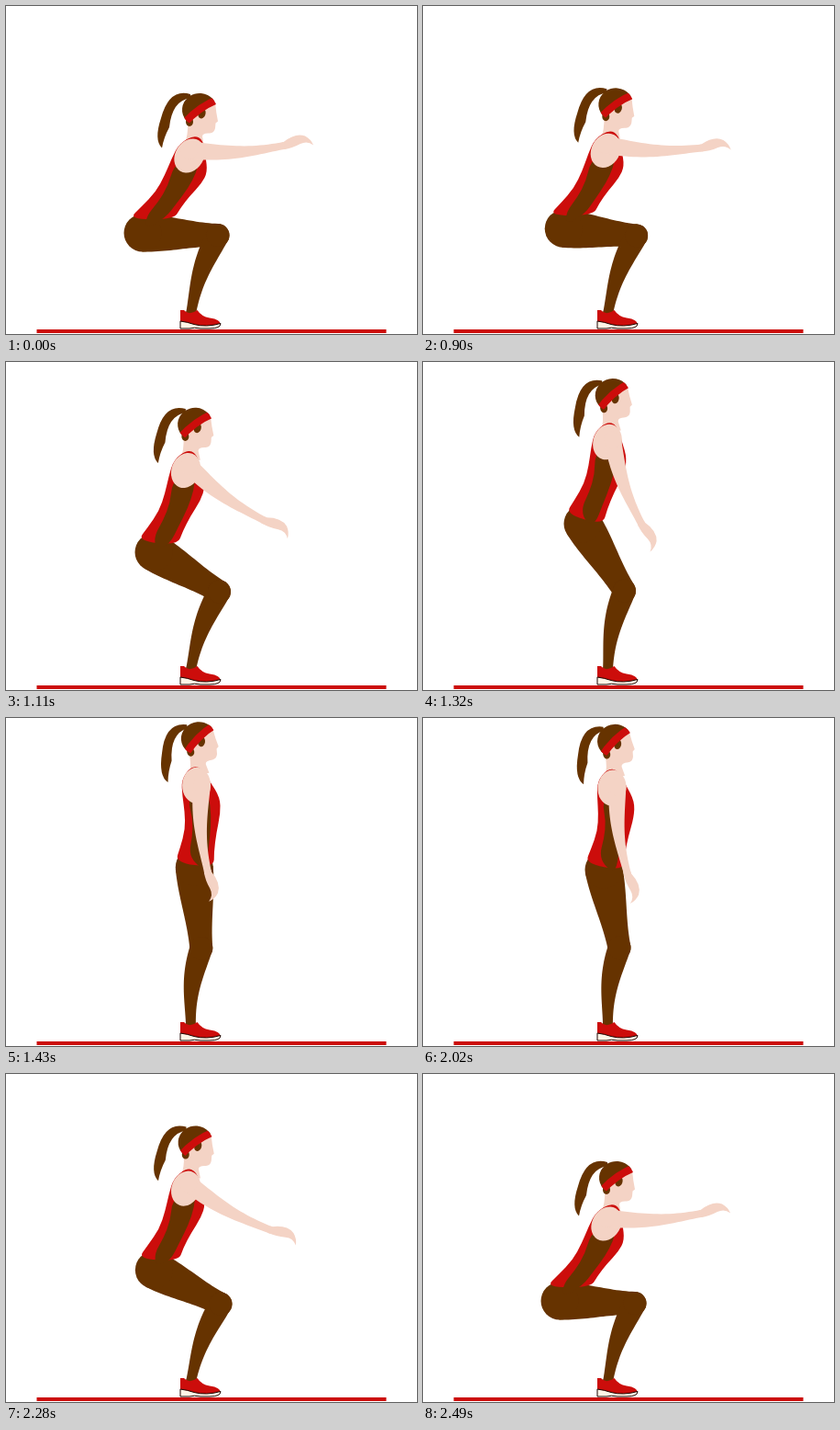
Recreate the animation shown at these times as an HTML page with a canvas. Size 448 by 357 pixels, loop 2.79 s.

```html
<!DOCTYPE html>
<html lang="en">
<head>
<meta charset="utf-8">
<title>Squat</title>
<style>
html, body { margin: 0; width: 100%; height: 100%; overflow: hidden; background: #fff; }
canvas { display: block; width: 448px; height: 357px; }
</style>
</head>
<body>
<canvas id="stage"></canvas>
<script>
const W = 448, H = 357, LOOP = 2790, TOP = 21;
const RED = '#cc0d0b', BROWN = '#663300', SKIN = '#f4d3c5';
const ANKLE = [201.5, 335];
const canvas = document.getElementById('stage');
const ctx = canvas.getContext('2d');
const dpr = window.devicePixelRatio || 1;
canvas.width = W * dpr;
canvas.height = H * dpr;

// Joints at four heights of the rise, from the squat to nearly upright.
const HEIGHTS = [0, 9, 17, 20.2];
const JOINTS = {
  knee: [[231, 249.5], [232.5, 250], [219.5, 249], [214, 250]],
  hip: [[149, 247], [161, 207], [174, 176], [197, 165]],
  shoulder: [[200, 163], [196, 118], [201, 87], [206, 76]],
  wrist: [[303, 152], [281.5, 172.5], [238, 176], [223, 170]],
  tilt: [[0], [-1], [-6], [-9]]
};

// Torso outlines: distance in front of the spine, distance above the hip.
const SHIRT = [[-21, 5], [-16, 23], [-11, 45], [-12, 66], [-15, 85], [-16.5, 104], [-7, 120],
  [4, 120], [15, 107], [26, 93], [27, 79], [23, 61], [21, 44], [21.5, 30]];
const PANEL = [[-9, 80], [-3, 58], [-3, 37], [-6, 18], [0, 5],
  [13, 27], [15, 48], [17, 67], [16, 86], [11, 101], [0, 95]];

const smooth = t => t * t * (3 - 2 * t);

// Lagrange weights: one smooth curve through all keys.
function weights(keys, x) {
  return keys.map((a, i) => keys.reduce((p, b, j) => i === j ? p : p * (x - b) / (a - b), 1));
}

function rise(t) {
  if (t < 900) return 0;
  if (t < 2020) return Math.min(TOP, Math.floor((t - 900) / 26) + 1);
  const step = Math.min(18, Math.floor((t - 2020) / 27.6) + 1);
  const [a, b] = weights([1, 10, 18], step);
  return 20.2 * a + 7.5 * b;
}

function poseAt(height) {
  const w = weights(HEIGHTS, height), pose = {};
  for (const name in JOINTS) {
    const keys = JOINTS[name];
    pose[name] = keys[0].map((_, i) => w.reduce((sum, k, j) => sum + k * keys[j][i], 0));
  }
  return pose;
}

function fill(color, path) {
  ctx.fillStyle = color;
  if (path) ctx.fill(path); else ctx.fill();
}

// Rounded limb from a to b; its radius eases from ra to rb, its middle bows sideways.
function limb(a, b, ra, rb, bow, color) {
  const dx = b[0] - a[0], dy = b[1] - a[1], len = Math.hypot(dx, dy);
  const nx = -dy / len, ny = dx / len, N = 24;
  ctx.beginPath();
  for (let i = 0; i <= 2 * N + 1; i++) {
    const side = i <= N ? 1 : -1;
    const t = (i <= N ? i : 2 * N + 1 - i) / N;
    const off = bow * Math.sin(Math.PI * t) + side * (ra + (rb - ra) * smooth(t));
    ctx.lineTo(a[0] + dx * t + nx * off, a[1] + dy * t + ny * off);
  }
  fill(color);
  for (const [p, r] of [[a, ra], [b, rb]]) {
    ctx.beginPath();
    ctx.arc(p[0], p[1], r, 0, 2 * Math.PI);
    fill(color);
  }
}

// Closed curve that rounds every corner between the edge midpoints.
function blob(points, color) {
  const n = points.length;
  const mid = i => [0, 1].map(k => (points[i % n][k] + points[(i + 1) % n][k]) / 2);
  ctx.beginPath();
  ctx.moveTo(...mid(0));
  for (let i = 1; i <= n; i++) ctx.quadraticCurveTo(...points[i % n], ...mid(i));
  fill(color);
}

function oval(x, y, rx, ry, color, turn = 0) {
  ctx.beginPath();
  ctx.ellipse(x, y, rx, ry, turn, 0, 2 * Math.PI);
  fill(color);
}

function local([x, y], angle, paint) {
  ctx.save();
  ctx.translate(x, y);
  ctx.rotate(angle);
  paint();
  ctx.restore();
}

const tail = new Path2D('M201 96Q178 89 169 122Q161 146 170 154.5Q172 143 178 132Q181 103 201 100Z');
const face = new Path2D('M199 112L228 105Q229 116 231 125.5L228.5 127.5L228 133Q227 138 222 138.5Q214 138 214 142L216 152H194Q199 140 198 126Z');
const hand = new Path2D('M0-4Q14-13 24-8Q30-4 32 3Q26-3 18 0Q8 4 0 4Z');
const upper = new Path2D('M190 331H194Q198 336 205 333L208.5 331Q213 338 222 339.5Q234 341 234 347L220 350L190 347Z');
const sole = new Path2D('M190 343Q198 344 205 346.5Q218 350 234 345.5Q234 351 222 351H212Q205 349.5 200 351H190Z');

function drawHead() {
  ctx.translate(-200, -163);
  fill(BROWN, tail);
  fill(SKIN, face);
  oval(200, 126, 4, 5, BROWN);
  oval(213.5, 117, 4, 5.5, BROWN, 0.3);
  ctx.beginPath();
  ctx.ellipse(211, 113, 19, 18, 0, 2.45, 5.75);
  fill(BROWN);
  ctx.beginPath();
  ctx.ellipse(211, 113, 19, 18, 0, 0, 2 * Math.PI);
  ctx.clip();
  ctx.beginPath();
  ctx.moveTo(192, 130);
  ctx.quadraticCurveTo(210, 109, 233, 101);
  ctx.strokeStyle = RED;
  ctx.lineWidth = 8;
  ctx.stroke();
}

function drawTorso({ hip, shoulder }, lift) {
  const dx = shoulder[0] - hip[0], dy = shoulder[1] - hip[1];
  const scale = Math.hypot(dx, dy) / 98;
  // The front lengthens towards the waist as the body straightens.
  const place = ([v, u]) => [v, -scale * (v > 0 ? u - lift * (30 - (u - 30) / 3) : u)];
  local(hip, Math.atan2(dx, -dy), () => {
    blob(SHIRT.map(place), RED);
    blob(PANEL.map(place), BROWN);
    oval(0, -98 * scale, 15.5, 19.5, SKIN);
  });
}

function drawArm({ shoulder, wrist }) {
  const angle = Math.atan2(wrist[1] - shoulder[1], wrist[0] - shoulder[0]);
  const top = [shoulder[0] + 6 * Math.sin(angle), shoulder[1] - 6 * Math.cos(angle)];
  limb(top, wrist, 9.5, 4, 4.5, SKIN);
  local(wrist, angle, () => fill(SKIN, hand));
}

function drawShoe() {
  fill(RED, upper);
  fill('#fff4e6', sole);
  ctx.strokeStyle = '#1c0500';
  ctx.lineWidth = 1;
  ctx.stroke(sole);
}

function draw(t) {
  const height = rise(t), pose = poseAt(height);
  ctx.setTransform(dpr, 0, 0, dpr, 0, 0);
  ctx.fillStyle = '#fff';
  ctx.fillRect(0, 0, W, H);
  ctx.fillStyle = RED;
  ctx.fillRect(33.5, 352, 381, 4);
  local(pose.shoulder, pose.tilt[0] * Math.PI / 180, drawHead);
  limb(pose.hip, pose.knee, 20.5, 12.5, 0, BROWN);
  limb(ANKLE, pose.knee, 5.5, 12.5, -4.5, BROWN);
  drawTorso(pose, height / TOP);
  drawArm(pose);
  drawShoe();
}

const start = performance.now();
function tick() {
  draw((performance.now() - start) % LOOP);
  requestAnimationFrame(tick);
}
tick();
</script>
</body>
</html>
```
